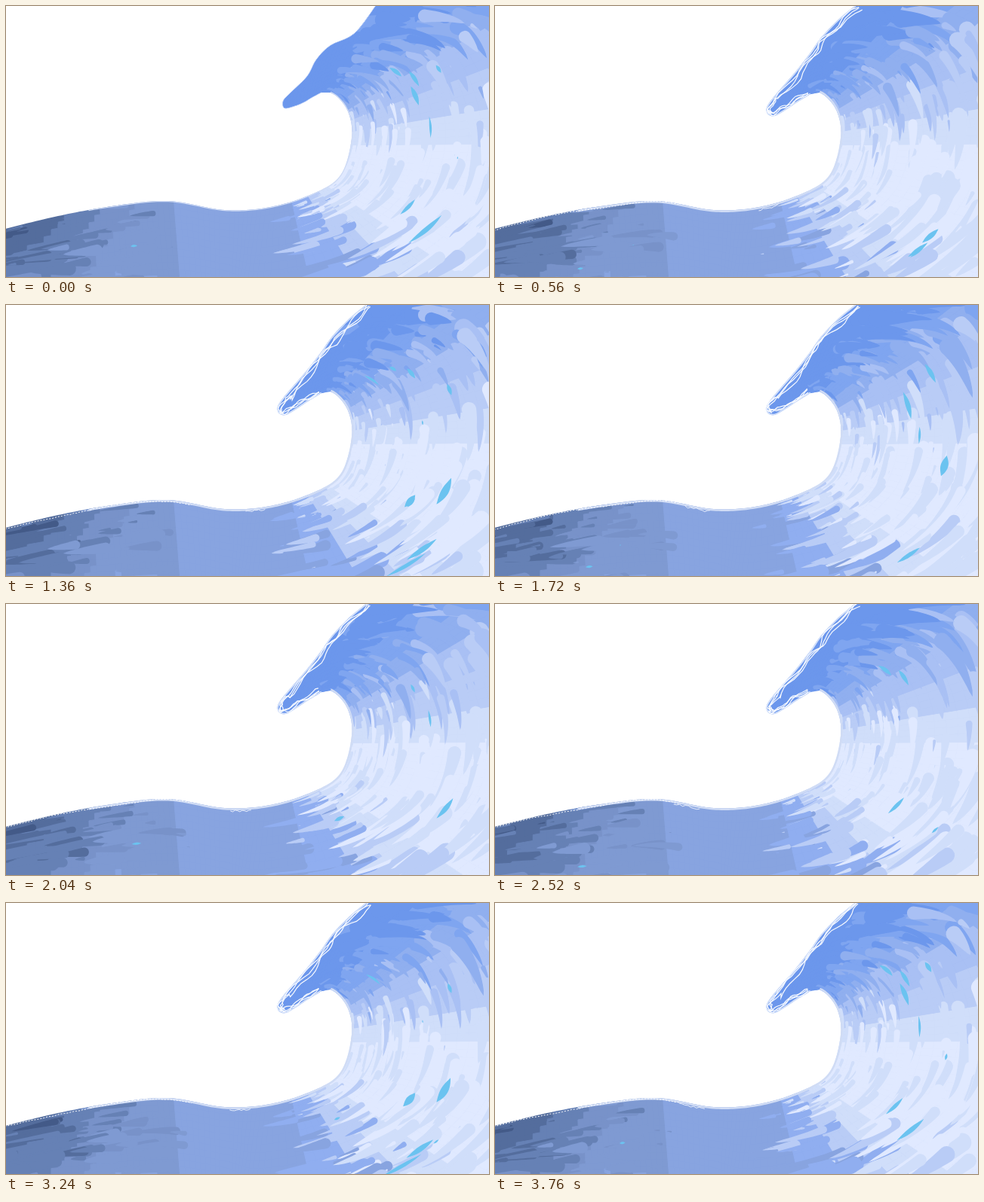
Write an HTML page with a canvas that moves like this. It is 640 px wide and 360 px high and loops after 3.8 s.

```html
<!DOCTYPE html>
<html lang="en">
<head>
<meta charset="utf-8">
<title>Wave</title>
<style>
html, body { margin: 0; width: 100%; height: 100%; overflow: hidden; background: #fff; }
canvas { display: block; width: 640px; height: 360px; }
</style>
</head>
<body>
<canvas id="stage" width="640" height="360"></canvas>
<script>
const LOOP = 3800, STEP = 40, TAU = Math.PI * 2;
const ctx = document.getElementById('stage').getContext('2d');

// Flow rows: inner x, y and outer x, y
const ROWS = [
  [-40, 306, -40, 430], [60, 281, 60, 440], [140, 266, 150, 440], [215, 259, 230, 440],
  [290, 271, 290, 450], [350, 267, 330, 480], [405, 250, 540, 440], [443, 225, 720, 310],
  [458, 175, 770, 150], [452, 138, 700, -10], [430, 115, 560, -30], [408, 122, 445, 5],
  [372, 142, 365, 120]
];
const TONES = ['#435a88', '#546d9d', '#6681b5', '#7892c9', '#7f9ad2', '#88a4e0', '#90aef0', '#b9ccf6',
  '#d0defa', '#e0e9ff', '#d0defa', '#b9ccf6', '#a9c0f4', '#90afef', '#7fa5f0', '#6c97ec'];
const RAMP = [[-1, 0], [0, .2], [1, 1.2], [2, 3], [3, 4.4], [3.5, 5], [5.3, 5], [5.8, 6.3], [6.25, 8],
  [6.7, 9], [7.5, 9], [8, 10], [8.5, 11.5], [9, 12.7], [9.5, 14], [10.1, 15], [14, 15]];
const CREST = [[418, 117], [400, 128], [385, 138], [371, 146], [362, 144], [360, 135],
  [370, 120], [396, 90], [418, 62], [432, 42], [455, 18], [478, -1]];
const CREST_START = [[418, 115], [405, 122], [395, 128], [383, 133], [369, 136], [367, 126],
  [378, 114], [399, 93], [411, 71], [430, 52], [462, 36], [490, -1]];

const lerp = (a, b, k) => a + (b - a) * k;
const clamp = (v, a, b) => Math.max(a, Math.min(b, v));

function rng(seed) {
  return () => {
    seed = (seed + 0x6D2B79F5) | 0;
    let h = Math.imul(seed ^ seed >>> 15, 1 | seed);
    h = h + Math.imul(h ^ h >>> 7, 61 | h) ^ h;
    return ((h ^ h >>> 14) >>> 0) / 4294967296;
  };
}

function spline(a, b, c, d, k) {
  return b + .5 * k * (c - a + k * (2 * a - 5 * b + 4 * c - d + k * (3 * (b - c) + d - a)));
}

function flow(u, s) {
  u = clamp(u, 0, ROWS.length - 1.001);
  const i = Math.floor(u);
  const row = n => ROWS[clamp(n, 0, ROWS.length - 1)];
  return [0, 1].map(axis => {
    const v = n => lerp(row(n)[axis], row(n)[axis + 2], s);
    return spline(v(i - 1), v(i), v(i + 1), v(i + 2), u - i);
  });
}

function tone(u, s) {
  let i = 0;
  while (i < RAMP.length - 2 && u > RAMP[i + 1][0]) i++;
  const [u0, a] = RAMP[i], [u1, b] = RAMP[i + 1];
  const v = lerp(a, b, clamp((u - u0) / (u1 - u0), 0, 1));
  return u < 3.5 ? Math.min(5, v + 3 * s * clamp(3 - u, 0, 1)) : v;
}
const paint = v => TONES[clamp(Math.round(v), 0, 15)];

function makeStrokes() {
  const r = rng(4127), list = [];
  for (let i = 0; i < 430; i++) {
    const left = i % 5 === 0;
    const u = left ? lerp(-.9, 2.15, r()) : lerp(4.75, 9.9, r());
    const s = left ? r() * .62 : Math.pow(r(), 1.15) * .85;
    const span = lerp(.75, 1.25, r());
    const jitter = (r() - .5) * 2.2;
    list.push({
      u, s, span,
      width: (left ? 3 + 9 * s : 2.2 + 11 * s) * lerp(.7, 1.3, r()),
      color: paint(Math.min(tone(u + span * .5, s) + jitter, left ? 4.4 : 15)),
      rate: 3 + Math.floor(r() * 3),
      phase: r()
    });
  }
  return list;
}

function makeGlints() {
  const r = rng(88);
  return Array.from({ length: 16 }, (_, i) => {
    const left = i > 13;
    return {
      u: left ? lerp(1.4, 2.4, r()) : lerp(6, 8.9, r()),
      s: left ? lerp(.3, .55, r()) : lerp(.08, .62, r()),
      span: left ? .25 : lerp(.3, .7, r()),
      width: left ? 1.5 : lerp(1.5, 6, r()),
      color: '#6bc3f0', rate: 2 + i % 3, phase: r(), glint: true
    };
  });
}

function drawStroke(o, time) {
  let p = (time * o.rate + o.phase) % 1;
  if (o.glint) {
    p /= .45;
    if (p > 1) return;
  }
  const head = o.u + o.span * Math.min(1, p / .6);
  const tail = o.u + o.span * Math.max(0, (p - .4) / .6);
  const size = o.width * Math.min(1, (head - tail) / (o.span * .4));
  if (head - tail < .02 || head < 0) return;
  const N = 12, a = [], b = [];
  let end, angle;
  for (let i = 0; i <= N; i++) {
    const q = i / N, u = lerp(tail, head, q);
    const [x, y] = flow(u, o.s), [x0, y0] = flow(u - .03, o.s), [x1, y1] = flow(u + .03, o.s);
    angle = Math.atan2(y1 - y0, x1 - x0);
    const w = size * (o.glint ? Math.sin(Math.PI * q) : Math.pow(q, .65));
    const nx = -Math.sin(angle) * w, ny = Math.cos(angle) * w;
    a.push([x + nx, y + ny]);
    b.unshift([x - nx, y - ny]);
    end = [x, y];
  }
  ctx.beginPath();
  a.forEach(pt => ctx.lineTo(...pt));
  if (!o.glint) ctx.arc(end[0], end[1], size, angle + Math.PI / 2, angle - Math.PI / 2, true);
  b.forEach(pt => ctx.lineTo(...pt));
  ctx.fillStyle = o.color;
  ctx.fill();
}

function makeBase() {
  const c = document.createElement('canvas');
  c.width = 640;
  c.height = 360;
  const g = c.getContext('2d');
  g.fillStyle = TONES[15];
  g.fillRect(0, 0, 640, 360);
  const du = .1, ds = .05;
  for (let u = 0; u < 11.9; u += du) {
    for (let s = -.1; s < 1; s += ds) {
      g.beginPath();
      [[u, s], [u + du, s], [u + du, s + ds], [u, s + ds]].forEach(q => g.lineTo(...flow(...q)));
      g.closePath();
      g.fillStyle = g.strokeStyle = paint(tone(u, Math.max(0, s)));
      g.fill();
      g.stroke();
    }
  }
  return c;
}

const base = makeBase(), strokes = makeStrokes(), glints = makeGlints();

function innerEdge(from, to, shift = () => 0) {
  for (let u = from; u <= to + .001; u += .05) {
    const [x, y] = flow(u, 0);
    ctx.lineTo(x, y + shift(u));
  }
}

function crestAt(points, k) {
  const i = Math.min(Math.floor(k), points.length - 2);
  const p = n => points[clamp(n, 0, points.length - 1)];
  return [0, 1].map(n => spline(p(i - 1)[n], p(i)[n], p(i + 1)[n], p(i + 2)[n], k - i));
}

function crestEdge(points) {
  for (let k = 0; k <= 11; k += .2) ctx.lineTo(...crestAt(points, k));
}

function silhouette(points) {
  ctx.beginPath();
  innerEdge(0, 10);
  crestEdge(points);
  ctx.lineTo(660, -10);
  ctx.lineTo(660, 380);
  ctx.lineTo(-40, 380);
  ctx.closePath();
}

function line(color, width) {
  ctx.strokeStyle = color;
  ctx.lineWidth = width;
  ctx.stroke();
}

// Loose white foam lines that wander inside the crest
function foam(points, tick) {
  for (let n = 0; n < 3; n++) {
    const r = rng(Math.floor(tick / 2) * 7 + n * 131);
    const a = r() * TAU, b = r() * TAU, reach = 5 + r() * 9;
    ctx.beginPath();
    for (let k = .2; k <= 11; k += .2) {
      const [x, y] = crestAt(points, k);
      const wobble = .5 + .3 * Math.sin(k * 1.7 + a) + .2 * Math.sin(k * 4.3 + b);
      const depth = wobble * (k < 5 ? 7 : reach) + r() * 1.2;
      const dir = k < 4 ? [-.25, -1] : k < 6 ? [1, -.3] : [.8, .55];
      ctx.lineTo(x + dir[0] * depth, y + dir[1] * depth);
    }
    line('#f7faff', 1.2);
  }
}

function rim(tick) {
  const r = rng(tick * 17 + 5);
  const a = r() * TAU;
  ctx.beginPath();
  innerEdge(1.6, 10);
  line('#d0dcf5', tick < 2 ? 2.5 : 5);
  if (tick < 2) return;
  ctx.beginPath();
  innerEdge(0, 3.4, u => 1 + Math.sin(u * 3 + a) + r());
  ctx.setLineDash([2, 2]);
  line('#fff', 1);
  ctx.setLineDash([]);
  ctx.beginPath();
  const start = 3 + r() * 2;
  innerEdge(start, start + .45, () => 2 + r() * 3);
  line('#e9effc', 1);
}

function draw(ms) {
  const tick = Math.floor((ms % LOOP) / STEP);
  const time = tick * STEP / LOOP;
  const grow = Math.min(1, tick / 3);
  const points = CREST_START.map((p, i) => p.map((v, n) => lerp(v, CREST[i][n], grow)));
  ctx.fillStyle = '#fff';
  ctx.fillRect(0, 0, 640, 360);
  ctx.save();
  silhouette(points);
  ctx.clip();
  ctx.drawImage(base, 0, 0);
  strokes.forEach(o => drawStroke(o, time));
  glints.forEach(o => drawStroke(o, time));
  rim(tick);
  ctx.beginPath();
  crestEdge(points);
  line('#d8e4fb', tick < 2 ? 1 : 3);
  if (tick > 1) foam(points, tick);
  ctx.restore();
}

const begin = performance.now();
function frame() {
  draw(Math.max(0, performance.now() - begin));
  requestAnimationFrame(frame);
}
frame();
</script>
</body>
</html>
```
